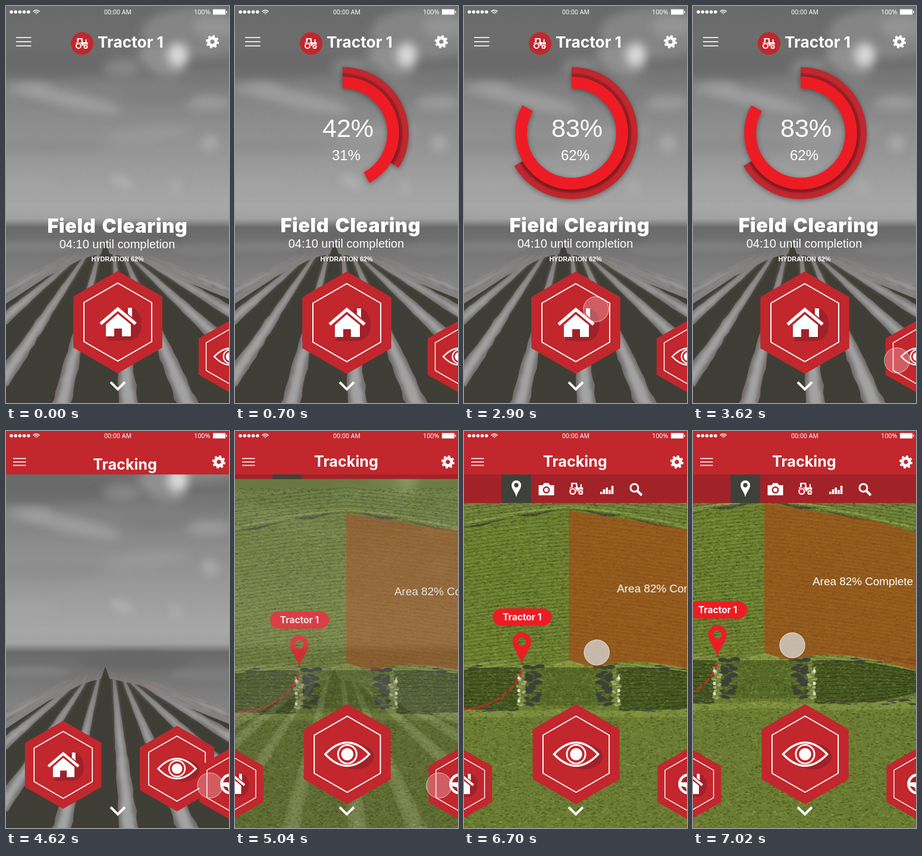
These frames come from a looping animation (375 px wide and 667 px high, 7040 ms). An HTML page with a canvas:

```html
<!DOCTYPE html>
<html lang="en">
<head>
<meta charset="utf-8">
<title>Tractor control</title>
<style>
html, body { margin: 0; height: 100%; overflow: hidden; background: #666; }
canvas { display: block; width: 375px; height: 667px; }
</style>
</head>
<body>
<canvas id="stage" width="375" height="667"></canvas>
<script>
const W = 375, H = 667, LOOP = 7040, TAU = Math.PI * 2;
const RED = '#c1272d', DARK_RED = '#a02129', BRIGHT = '#ed1c24', WHITE = '#fff';
const SANS = '"Liberation Sans", Arial, sans-serif', WIDE = 'Inter, sans-serif', STATUS = '"Noto Sans", sans-serif';
const screen = document.getElementById('stage').getContext('2d');
let g = screen;

// Timing
const mix = (a, b, p) => a + (b - a) * p;
const span = (t, from, to) => Math.min(1, Math.max(0, (t - from) / (to - from)));
const smooth = p => p * p * (3 - 2 * p);
const cubic = p => p < .5 ? 4 * p ** 3 : 1 - 4 * (1 - p) ** 3;
const quintOut = p => 1 - (1 - p) ** 5;
const between = (a, b, p) => a.map((v, i) => mix(v, b[i], p));
const bend = (a, c, b, p) => between(between(a, c, p), between(c, b, p), p);

let seed = 7;
const random = () => (seed = (seed * 16807) % 2147483647) / 2147483647;
const jitter = size => (random() - .5) * 2 * size;

// Drawing
function shape(d, fill, stroke, width = 1) {
  const path = new Path2D(d);
  if (fill) { g.fillStyle = fill; g.fill(path, 'evenodd'); }
  if (stroke) { g.strokeStyle = stroke; g.lineWidth = width; g.stroke(path); }
}
function ellipse(x, y, rx, ry, fill, tilt = 0) {
  g.beginPath();
  g.ellipse(x, y, rx, ry, tilt, 0, TAU);
  g.fillStyle = fill;
  g.fill();
}
function arc(x, y, r, width, color, from = 0, to = TAU) {
  g.beginPath();
  g.arc(x, y, r, from, to);
  g.strokeStyle = color;
  g.lineWidth = width;
  g.stroke();
}
function rect(x, y, w, h, fill) { g.fillStyle = fill; g.fillRect(x, y, w, h); }
function text(value, x, y, font, align = 'left') {
  g.font = font;
  g.textAlign = align;
  g.fillStyle = WHITE;
  g.fillText(value, x, y);
}
function at(x, y, scale, draw) {
  g.save();
  g.translate(x, y);
  g.scale(scale, scale);
  draw();
  g.restore();
}
function layer(width, height, draw) {
  const canvas = document.createElement('canvas');
  canvas.width = width;
  canvas.height = height;
  const previous = g;
  g = canvas.getContext('2d');
  draw();
  g = previous;
  return canvas;
}
function gradient(y0, y1, ...stops) {
  const fill = g.createLinearGradient(0, y0, 0, y1);
  stops.forEach(([at, level]) => fill.addColorStop(at, `rgb(${level},${level},${level})`));
  return fill;
}

// Grey field under a cloudy sky
function ridge(x, y, endX, endY, width) {
  const steps = Math.round(Math.hypot(endX - x, endY - y) / 12);
  const length = Math.hypot(endX - x, endY - y);
  const side = (sign, size) => Array.from({ length: steps + 1 }, (_, i) => {
    const p = i / steps, half = sign * mix(3, width, p) / 2 * size + jitter(2 * p);
    return `${mix(x, endX, p) + half * (endY - y) / length} ${mix(y, endY, p) - half * (endX - x) / length}`;
  });
  const strip = size => `M${[...side(1, size), ...side(-1, size).reverse()].join('L')}Z`;
  shape(strip(1), '#6f6f6e', 'rgba(150,100,98,.6)', 1);
  g.filter = 'blur(3px)';
  shape(strip(.6), '#a2a2a2');
  g.filter = 'none';
}
const photo = layer(W, H, () => {
  rect(0, 0, W, 372, gradient(0, 372, [0, 106], [.27, 112], [.36, 128], [.6, 146], [.9, 167], [.96, 162], [1, 108]));
  g.filter = 'blur(8px)';
  const cloud = (x, y, rx, ry, level, alpha, tilt = 0) =>
    ellipse(x, y, rx, ry, `rgba(${level},${level},${level},${alpha})`, tilt);
  cloud(60, 95, 130, 24, 105, .8);
  cloud(322, 45, 95, 42, 138, .85);
  cloud(350, 35, 35, 18, 158, .6);
  cloud(262, 92, 42, 22, 158, .7, .4);
  cloud(195, 103, 32, 14, 140, .8);
  cloud(340, 125, 50, 12, 118, .6);
  cloud(110, 158, 85, 13, 168, .7, .22);
  cloud(40, 140, 40, 12, 160, .7);
  cloud(340, 163, 38, 11, 165, .7);
  cloud(255, 150, 60, 16, 124, .6);
  cloud(70, 235, 100, 15, 135, .5);
  cloud(240, 215, 75, 12, 158, .6, -.1);
  cloud(343, 230, 13, 13, 182, .7);
  cloud(195, 295, 20, 9, 185, .7, .4);
  cloud(285, 304, 10, 14, 178, .6);
  cloud(30, 300, 60, 12, 168, .5);
  cloud(289, 82, 17, 20, 225, .9);
  g.filter = 'none';
  rect(0, 371, W, H - 371, gradient(371, H, [0, 106], [.12, 116], [.3, 130], [1, 130]));
  g.filter = 'blur(5px)';
  ellipse(215, 386, 95, 16, '#686868');
  ellipse(40, 405, 70, 9, '#808080');
  ellipse(335, 410, 60, 11, '#7c7c7c');
  g.filter = 'none';
  shape('M0 500L70 454 130 424 160 416 167 396 174 416 225 427 300 462 375 492V667H0Z', '#3e3e37');
  ridge(108, 421, -5, 482, 13);
  ridge(124, 417, -5, 528, 18);
  ridge(138, 414, -8, 632, 28);
  ridge(157, 411, 92, 675, 32);
  ridge(181, 411, 207, 675, 34);
  ridge(196, 414, 308, 675, 34);
  ridge(208, 420, 385, 584, 26);
  ridge(224, 422, 385, 518, 18);
  ridge(240, 424, 385, 480, 13);
});

// Aerial map: one half of the land, mirrored around x = 187
const land = layer(265, 700, () => {
  rect(0, 0, 265, 700, '#6b7c33');
  shape('M0 100H265V178Q120 142 0 126Z', '#72853b');
  shape('M0 136Q120 148 265 189V400Q170 385 120 390L50 402 0 389Z', '#718434');
  shape('M0 131Q120 143 265 184', null, '#899a4a', 5);
  shape('M20 138L90 147 60 148ZM100 151L185 168 150 165Z', '#42463a');
  shape('M0 390L50 403 110 392Q180 388 265 418V425Q160 398 80 402L0 402Z', '#879645');
  rect(0, 402, 72, 64, '#586a28');
  shape('M80 403Q170 398 265 424V452Q180 484 85 474Z', '#485923');
  shape('M0 470Q90 482 265 466V482Q120 490 0 482Z', '#7d8e3e');
  for (let y = 95; y < 395; y += 6) {
    const shade = y % 4 ? 'rgba(45,58,14,.28)' : 'rgba(160,175,80,.2)';
    shape(`M0 ${y}Q130 ${y + 10 + jitter(2)} 265 ${y + 34}`, null, shade, 2);
  }
  for (let i = -5; i < 6; i++)
    shape(`M85 ${438 + i * 7}Q180 ${436 + i * 7} 265 ${440 + i * 3}`, null, 'rgba(25,35,10,.35)', 1.5);
  for (let i = 0; i < 16000; i++) {
    const x = random() * 265, y = 95 + random() * 605, length = 1 + random() * 4;
    const color = random() < .55 ? `rgba(28,38,8,${.1 + random() * .22})` : `rgba(185,200,95,${.08 + random() * .2})`;
    rect(x, y, length, 1 + random(), color);
  }
  for (let i = 0; i < 40; i++) {
    const y = 400 + random() * 66;
    ellipse(48 + random() * 24, y, 3 + random() * 6, 1 + random() * 3, '#3d4038');
    ellipse(74 + random() * 12, y, 1 + random() * 4, 1 + random() * 2, i % 3 ? '#7c8b42' : '#a5ad78');
  }
  [420, 441, 458].forEach(y => ellipse(84, y, 2.5, 3, '#e4e3cc'));
  for (let i = 0; i < 45; i++)
    ellipse(95 + random() * 170, (i % 2 ? 403 : 472) + jitter(5), 4 + random() * 5, 1, '#40443a');
});
const map = layer(450, 700, () => {
  g.drawImage(land, 187, 0);
  g.save();
  g.translate(187, 0);
  g.scale(-1, 1);
  g.drawImage(land, 0, 0);
  g.restore();
  shape('M187 138L375 168 450 191V423C400 405 340 393 300 393Q262 391 235 402 215 400 187 389Z', 'rgba(170,72,20,.64)');
  text('Area 82% Complete', 268, 276, `18.9px ${SANS}`);
  g.setLineDash([10, 5]);
  shape('M108 408C92 450 45 480-20 470', null, BRIGHT, 2.6);
  g.setLineDash([]);
  g.beginPath();
  g.roundRect(59, 303, 99, 29, 14.5);
  g.fillStyle = BRIGHT;
  g.fill();
  text('Tractor 1', 108.5, 323, `700 15.5px ${WIDE}`, 'center');
  at(108, 358.5, 1, () => pin(BRIGHT));
});

// Icons, each around its own centre
function pin(color) {
  shape('M0 39C-3 22-15.5 13-15.5 0A15.5 15.5 0 0 1 15.5 0C15.5 13 3 22 0 39ZM7 0A7 7 0 1 0-7 0A7 7 0 1 0 7 0Z', color);
}
function tractor() {
  shape('M-8-9H1L2-2H6V-7H8V-2H10V4H-10V-2H-8ZM-5.5-7V-2H-.5L-1-7Z', WHITE);
  for (const [x, y, r] of [[-5.5, 4, 5], [6.5, 5.5, 3.5]]) {
    ellipse(x, y, r + 1, r + 1, RED);
    arc(x, y, r - 1, 2, WHITE);
  }
}
function gear() {
  arc(0, 0, 6.2, 5, WHITE);
  g.setLineDash([9.4 * TAU / 16]);
  arc(0, 0, 9.4, 3.4, WHITE);
  g.setLineDash([]);
}
function camera() {
  shape('M-13-7H-6L-4-10.5H4L6-7H13V10H-13ZM6 1A6 6 0 1 0-6 1A6 6 0 1 0 6 1Z', WHITE);
  ellipse(0, 1, 3.5, 3.5, WHITE);
}
function bars() { [4, 8, 11, 7, 14].forEach((h, i) => rect(-11 + i * 4.7, 8 - h, 3.6, h, WHITE)); }
function search() {
  arc(-2.5, -2.5, 6.5, 3, WHITE);
  shape('M2.5 2.5L10 10', null, WHITE, 4);
}
function house() {
  shape('M-6-16L23-25Q40-18 40 4 40 28 18 31H-18Z', DARK_RED);
  shape('M17-24H24V-8L17-14ZM-20 4L0-14 22 4V24H7V11H-6V24H-20Z', WHITE);
  shape('M-29 3L0-22 30 3', null, RED, 9);
  shape('M-29 3L0-22 30 3', null, WHITE, 5.5);
}
function eye() {
  ellipse(13, 4, 33, 22, DARK_RED);
  shape('M-38 0Q0-40 38 0Q0 40-38 0Z', RED, WHITE, 3.5);
  arc(0, 0, 16, 3, WHITE);
  ellipse(0, 0, 10.5, 10.5, WHITE);
}
function wheel() {
  ellipse(8, 5, 27, 26, DARK_RED);
  arc(0, 0, 22, 6.5, WHITE);
  shape('M-22-4H22V4L7 8 4 22H-4L-7 8-22 4Z', WHITE);
}
function hexagon(x, y, radius, icon) {
  at(x, y, radius / 86, () => {
    const outline = r => `M0 ${-r}L${r * .87} ${-r / 2}V${r / 2}L0 ${r}L${-r * .87} ${r / 2}V${-r / 2}Z`;
    shape(outline(86), RED);
    shape(outline(65.5), null, WHITE, 2);
    icon();
  });
}

// Screen parts
function statusBar(y) {
  for (let i = 0; i < 5; i++) ellipse(9 + i * 7.2, y, 2.8, 2.8, WHITE);
  for (const r of [1, 4, 7]) arc(51, y + 4, r, 1.6, WHITE, -Math.PI * .78, -Math.PI * .22);
  text('00:00 AM', 188, y + 4, `10.5px ${STATUS}`, 'center');
  text('100%', 343.5, y + 4, `10.8px ${STATUS}`, 'right');
  rect(348, y - 4.5, 21, 9, WHITE);
  rect(370, y - 2, 1.5, 4, WHITE);
}
function menu(x, y, width, gap) {
  for (const i of [-1, 0, 1]) rect(x, y + i * gap - .8, width, 1.6, WHITE);
}
function ring(r, width, share, color, shadow) {
  g.save();
  if (shadow) { g.shadowColor = 'rgba(0,0,0,.4)'; g.shadowBlur = 8; g.shadowOffsetY = 2; }
  arc(181, 213.5, r, width, color, -TAU / 4, TAU * (share - .25));
  g.restore();
}
function gauge(p) {
  if (p <= 0) return;
  ring(103, 16, .667 * p, RED, true);
  ring(97.5, 6, .667 * p, DARK_RED);
  ring(85, 20, .832 * p, BRIGHT, true);
  text(`${Math.round(83 * p)}%`, 190, 220, `43px ${SANS}`, 'center');
  text(`${Math.round(62 * p)}%`, 187, 259, `24px ${SANS}`, 'center');
}
function homeScreen(t) {
  const settle = smooth(span(t, 0, 720));
  g.drawImage(photo, 0, 0);
  statusBar(10);
  menu(17, 60, 25.5, 7);
  ellipse(128, 63, 19, 19, RED);
  at(127.5, 63, 1, tractor);
  text('Tractor 1', 154, 70, `700 26.3px ${WIDE}`);
  at(347, 60, 1, gear);
  gauge(smooth(span(t, 10, 1380)));
  g.letterSpacing = '.6px';
  g.wordSpacing = '3px';
  text('Field Clearing', mix(187.5, 194.5, settle), mix(381, 379.5, settle), `900 32.5px ${WIDE}`, 'center');
  g.letterSpacing = g.wordSpacing = '0px';
  text('04:10 until completion', 187, mix(407, 406, settle), `20px ${SANS}`, 'center');
  text('HYDRATION 62%', 187.5, 429, `bold 10.8px ${SANS}`, 'center');
  hexagon(377, 589, 61, eye);
  hexagon(188, mix(531, 532, settle), 86, house);
}
function toolbar(y) {
  rect(0, y, W, 48, 'rgba(163,33,40,.98)');
  rect(63, y, 50, 48, '#40403a');
  at(88, y + 18, .52, () => pin(WHITE));
  at(138.5, y + 25, 1, camera);
  at(189, y + 24, 1.12, tractor);
  at(240, y + 25, 1, bars);
  at(289, y + 25, 1, search);
}
function trackingScreen(t) {
  const slide = quintOut(span(t, 4536, 5240));
  const fade = smooth(span(t, 4640, 5240));
  const [dx, dy] = drag(t);
  if (fade < 1) g.drawImage(photo, 0, 0);
  g.globalAlpha = fade;
  g.drawImage(map, dx, dy);
  g.globalAlpha = 1;
  const drop = span(t, 4960, 5280);
  if (drop > 0) toolbar(mix(25, 73, smooth(drop)));
  rect(0, 0, W, 73, RED);
  statusBar(8);
  menu(12, 52, 21.5, 5.7);
  at(358, 52, 1, gear);
  text('Tracking', mix(158, 133, slide), mix(69, 60, slide), `700 25.2px ${WIDE}`);
  hexagon(...between([188, 532, 86], [-5.5, 593, 60.5], slide), house);
  hexagon(...between([377, 589, 61], [188.5, 543, 84], slide), eye);
  hexagon(378, 593, 60.5, wheel);
}

// Touch point
const drag = t => bend([0, 0], [-8, -7], [-67, -17], cubic(span(t, 6440, 7040)));
function touchPosition(t) {
  if (t < 1820) return between([397, -22], [251, 285], smooth(span(t, 740, 1380)));
  if (t < 2680) return between([251, 285], [216, 505], smooth(span(t, 1820, 2420)));
  if (t < 5700) return between([216, 505], [343, 595.5], smooth(span(t, 2680, 3620) ** 1.4));
  const [dx, dy] = drag(t);
  const [x, y] = bend([343, 595.5], [169, 467], [234, 377], 1 - (1 - span(t, 5700, 6340)) ** 1.5);
  return [x + dx, y + dy];
}
function touch(t) {
  if (t < 740) return;
  const pressed = t >= 6440 || (t >= 4380 && t < 4540);
  const [x, y] = touchPosition(t);
  ellipse(x, y, 21.5, 21.5, pressed ? 'rgba(212,207,202,.82)' : 'rgba(255,255,255,.25)');
  arc(x, y, 21.2, 1, 'rgba(255,255,255,.6)');
}

function frame(now) {
  const t = now % LOOP;
  (t < 4540 ? homeScreen : trackingScreen)(t);
  shape('M176 632L188 644 200 632', null, WHITE, 4);
  touch(t);
}
const start = performance.now();
(function tick() {
  frame(performance.now() - start);
  requestAnimationFrame(tick);
})();
</script>
</body>
</html>
```
